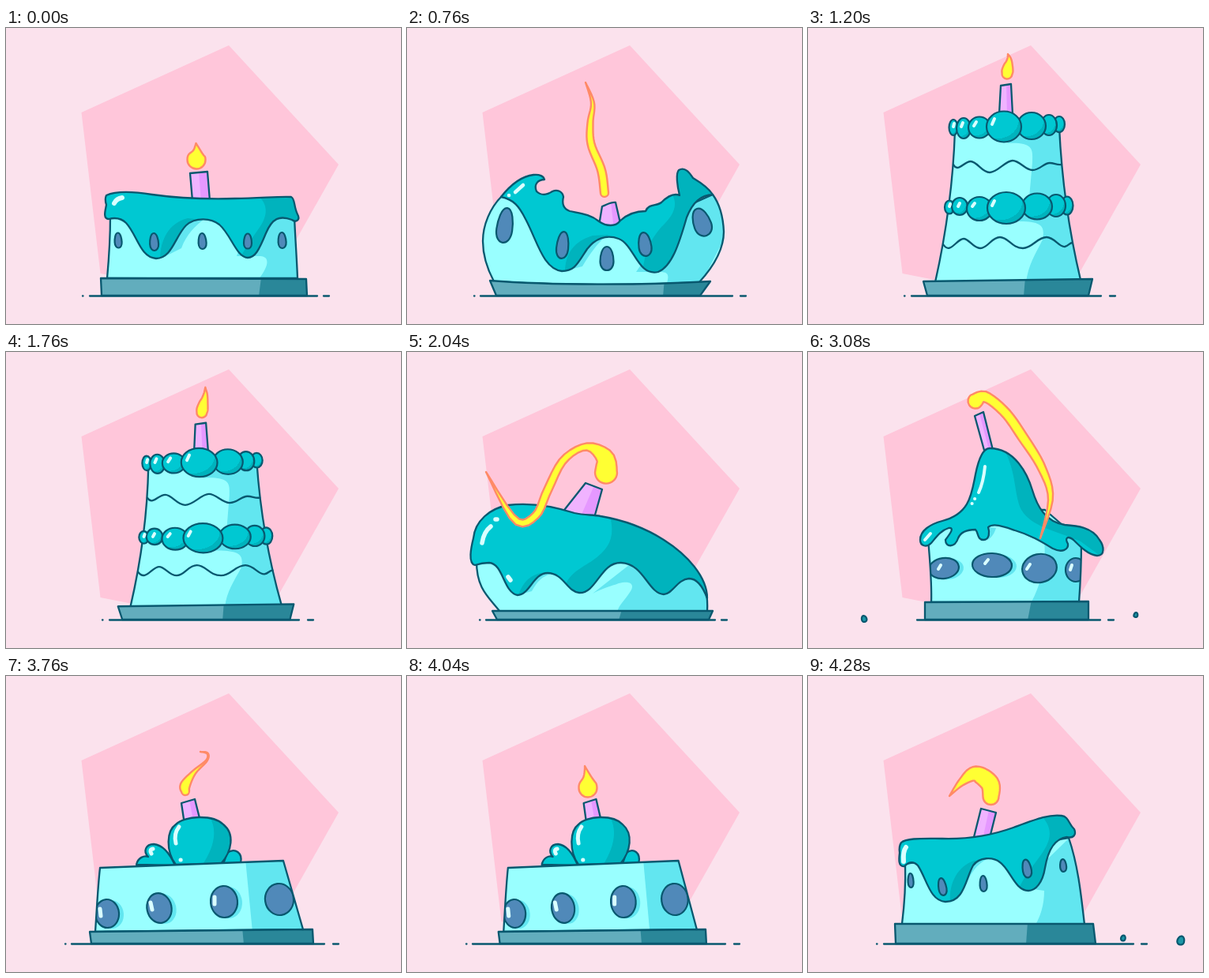
Recreate the animation shown at these times as an HTML page. Size 500 by 375 pixels, loop 4.36 s.

```html
<!DOCTYPE html>
<html lang="en">
<head>
<meta charset="utf-8">
<title>Birthday cakes</title>
<style>
  html, body { margin: 0; width: 100%; height: 100%; overflow: hidden; background: #fbe2ed; }
  svg { display: block; width: 100%; height: 100%; }
  path, ellipse { vector-effect: non-scaling-stroke; }
  .line { fill: none; stroke: #08586f; stroke-width: 2.3; stroke-linecap: round; stroke-linejoin: round; }
  .shine { fill: none; stroke: #d9ffff; stroke-linecap: round; }
  .flame { fill: #ffff33; stroke: #ff8a66; stroke-width: 2.4; stroke-linejoin: round; }
</style>
</head>
<body>
<svg viewBox="0 0 500 375">
  <defs>
    <radialGradient id="puff" cx=".32" cy=".28" r=".72">
      <stop offset=".84" stop-color="#00c8d2"/>
      <stop offset=".84" stop-color="#00b3bd"/>
    </radialGradient>
  </defs>
  <path fill="#ffc6da" d="M95.500 107 282 22 421 173 342 313 160 319 119.500 311Z"/>
  <g id="scene"></g>
</svg>
<script>
const LOOP = 4360, FLOOR = 339, MID = 245, SAMPLES = 32;
const INK = '#08586f';
const scene = document.getElementById('scene');

// Moments at which the drawing changes; it holds in between.
const steps = [
  0, 40, 120, 200, 280, 360, 480,
  600, 640, 680, 760, 800, 840, 920, 1000, 1080,
  1200, 1320, 1400, 1480, 1600, 1720,
  1760, 1800, 1840, 1880, 1960, 2040, 2080, 2120, 2200,
  2320, 2440, 2560, 2640, 2760,
  2920, 2960, 3000, 3080, 3160, 3240, 3320, 3400,
  3520, 3600, 3680, 3760, 3840, 3920, 4040,
  4120, 4200, 4280
];

// Flame spines run from base to tip: x y halfwidth.
const DROP = '241 167 11.500;241 162 10.500;241.500 155 4.500;240.500 146 0';
const DROP_TIP = [244, 183];

const drip = {
  tip: '244 183',
  ground: '97 106 394 402',
  base: 'M120 317 L380 318 L381 339 L121 339 Z',
  baseTone: 'M323 316 L382 316 L382 340 L320 340 Z',
  candle: 'M233 184 L255 182 L258 219 L236 219 Z',
  candleTone: 'M244 181 L257 180 L260 220 L247 220 Z',
  body: 'M132 238 C132 270 130 295 128 317 L369 317 C368 290 366 265 365 238 Z',
  bodyTone: 'M292 289 L322 289 C335 290 332 302 320 318 L371 318 L367 238 L310 238 Z M196 292 L222 279 C228 262 240 250 250 243 L228 240 Z',
  icing: 'M127 212 C140 206 160 207 185 211 C220 216 250 217 290 216 C320 216 345 213 361 214 C366 216 364 226 369 236 C373 243 367 247 362 243 C346 237 337 241 329 260 C320 282 315 291 306 291 C292 291 285 262 270 249 C260 241 240 239 228 250 C214 264 210 292 190 292 C170 291 166 262 152 247 C146 241 138 240 130 242 C122 242 126 230 127 224 C125 218 126 214 127 212 Z',
  icingTone: 'M318 212 C334 224 330 240 320 254 C310 268 302 280 296 292 L310 296 L375 250 L375 208 Z M195 294 C195 270 205 247 230 241 L250 243 L215 294 Z',
  seeds: '142 269 4.500 9.500 -3;187.500 271 5.500 11 -3;248.500 270 5 10 -3;306 270 5 9.500 0;349.500 269 5 10 -3',
  shine: 'M137 222 Q140 216 147 215',
  shineWidth: 6
};

const dripLean = {
  tip: '228 170',
  ground: '87 96 412 422',
  base: 'M110 314 L361 314 L364 339 L111 339 Z',
  baseTone: 'M278 312 L363 312 L366 340 L276 340 Z',
  candle: 'M219 168 L238 173 L230 205 L209 208 Z',
  candleTone: 'M229 170 L240 172 L232 206 L221 207 Z',
  body: 'M123 238 C124 270 122 290 119 314 L350 315 C346 280 342 240 330 205 Z',
  bodyTone: 'M285 270 L299 272 C299 290 294 305 288 315 L352 316 L332 204 L300 235 Z M180 288 L196 272 C204 258 206 244 226 232 L208 232 Z',
  icing: 'M118 211 C125 205 145 206 170 206 C205 207 235 201 260 192 C290 181 305 175 321 177 C330 178 330 188 337 194 C340 201 336 206 328 204 C312 206 304 220 300 243 C297 262 288 272 279 272 C262 272 256 245 243 236 C234 229 217 229 209 240 C199 258 198 286 174 286 C154 285 150 256 139 240 C134 235 128 235 122 241 C114 242 115 232 116 224 C115 218 116 214 118 211 Z',
  icingTone: 'M296 178 C312 195 306 210 296 225 C284 242 272 255 266 272 L280 276 L340 215 L340 172 Z M180 288 C178 264 188 242 210 234 L228 232 L198 288 Z',
  seeds: '130 259 3.500 9 -3;170 267 5 11 -10;222 263 4.500 10 -3;277 244 5.500 11.500 -10;323 240 4 8 -5',
  shine: 'M121 235 Q120 222 124 217'
};

const acts = [
  { // dripping cake, leaning in and settling
    ...drip, from: 0, lean: dripLean,
    flare: '231.500 153 10;230 136 11.500;212 124 9.500;195 134 4.500;179 152 0',
    flareAt: 4280, span: 80,
    keys: [[0, 1, 1, 0, 1], [120, 1, 1, 0, 1.08], [280, 1, 1, 0, .95], [480, 1, 1, 0, 1],
      [600, 1.02, .95, 0, 1], [640, 1.05, .88, 0, 1], [680, 1.08, .75, 0, 1],
      [4200, 1.04, .8, -4, -.1], [4280, 1, 1, 0, 0]]
  },
  { // the same cake, burst open
    from: 760, tip: '255 222', ground: '85 93 412 422',
    base: 'M105 320 C180 326 300 326 384 321 L371 339 L113 339 Z',
    baseTone: 'M326 318 L386 318 L374 340 L324 340 Z',
    candle: 'M247 226 C253 224 258 220 264 221 L272 256 L242 256 Z',
    candleTone: 'M258 220 L266 219 L274 256 L262 256 Z',
    body: 'M120 213 C105 228 96 250 96 270 C96 290 102 306 110 321 C180 326 300 326 370 322 C390 300 401 280 401 258 C400 235 395 222 387 211 L300 250 L200 250 Z',
    bodyTone: 'M290 309 L320 309 C332 309 332 314 328 326 L372 324 L405 260 L388 208 L350 220 Z M198 308 L222 302 C232 285 240 275 250 265 L230 268 Z',
    icing: 'M119 214 C130 200 143 188 160 186 C168 185 173 188 174 192 C166 192 160 198 164 207 C170 213 178 211 184 207 C190 204 197 207 198 214 C196 222 198 229 206 232 C220 235 232 236 243 245 C253 252 264 252 270 244 C280 235 292 232 302 232 C306 222 316 226 322 221 C330 213 338 209 345 212 C342 200 340 184 344 180 C352 175 358 184 362 190 C372 196 382 203 387 211 C372 212 362 220 354 240 C344 275 335 302 318 309 C292 315 288 275 268 267 C252 261 238 267 228 280 C215 300 212 308 196 308 C172 305 165 270 150 242 C142 226 135 217 119 214 Z',
    icingTone: 'M335 210 C345 225 335 240 322 252 C308 268 300 285 298 312 L330 312 L395 215 L360 178 L342 178 Z M200 310 C200 285 212 270 235 263 L255 262 L215 310 Z',
    seeds: '124 250 10 22 8;197 275 7.500 17 6;253 292 8.500 15 0;301 274 8 15 -8;373 246 11 18 -20',
    shine: 'M137 208 L147 199 M129 212 h.1', shineWidth: 4.5,
    flare: '250 209 5;246 180 5;233 147 4.500;232 120 3.500;235 95 2;226 69 0',
    flareAt: 760, span: 1000,
    keys: [[760, 1, 1, 0], [800, 1.04, .85, 0]]
  },
  { // tall cake with two cream rings
    from: 840, tip: '250 72', ground: '122 131 371 382',
    base: 'M146 321 L360 318 L355 339 L151 339 Z',
    baseTone: 'M275 316 L364 316 L358 340 L273 340 Z',
    candle: 'M244 73 L257 71 L259 109 L242 109 Z',
    candleTone: 'M251 70 L259 70 L261 110 L252 110 Z',
    body: 'M186 130 C184 190 176 255 161 322 L345 319 C331 260 321 190 318 125 Z',
    bodyTone: 'M252 146 C288 144 284 156 284 170 L280 215 L335 215 L318 125 L280 125 Z M246 246 C298 242 300 250 297 268 C287 288 279 300 276 322 L350 322 L330 215 L280 215 Z',
    waves: 'M184 173 C190 184 197 169 206 169 C214 169 220 183 230 183 C240 183 250 168 259 168 C268 168 275 180 284 180 C294 180 298 171 306 171 C312 171 315 174 321 173 M171 274 C180 288 188 267 197 267 C204 267 209 279 218 279 C228 279 232 265 243 265 C254 265 258 279 272 279 C284 279 290 265 302 265 C312 265 318 278 325 277 C330 276 331 272 335 272',
    blobs: '184 126 5.500 10;318 122 7 10;197 127 9 13;305 123 10 13;217 126 14 13.500;283 124 18 17;248 125 22 19.500;179 227 6 8.500;328 225 7.500 11.500;192 226 10 11;314 225 12 14;217 229 16 15;290 226 19 16.500;251 228 24 20',
    shine: 'M185 121 l-1 4 M196 120 l-2 5 M213 119 l-3 5 M236 115 l-3 7 M180 223 l-1 3 M192 222 l-2 4 M211 222 l-3 4 M236 219 l-3 6', shineWidth: 4,
    drop: '252 58 6.500;252.500 54 7;253.500 48 5.700;254.500 43 3.800;254.500 38 2;253 33 0',
    keys: [[840, .85, 1.14, 0], [920, .95, 1.1, -3], [1000, 1.08, .92, 2], [1080, .98, 1.03, -1],
      [1200, 1, 1, 0], [1400, 1, 1.01, 1], [1720, 1, 1, 0], [1760, 1.04, .93, 1], [1840, 1.15, .72, 4]]
  },
  { // glazed dome
    from: 1880, tip: '236 170', ground: '92 100 390 398',
    base: 'M108 328 L387 328 L382 339 L114 339 Z',
    baseTone: 'M272 326 L390 326 L384 340 L268 340 Z',
    candle: 'M226 166 L247 174 L237 210 L196 204 Z',
    candleTone: 'M237 169 L249 173 L239 211 L220 208 Z',
    body: 'M88 265 C88 300 103 310 117 328 L380 329 C381 310 378 295 370 288 L300 240 L100 250 Z',
    bodyTone: 'M235 306 C250 298 258 297 268 293 C284 289 288 295 283 303 C275 316 268 320 266 330 L382 330 L374 288 L300 255 Z M140 308 L158 303 C165 290 172 284 182 281 L160 278 Z',
    icing: 'M86 270 C77 268 81 248 84 236 C86 214 105 198 128 194 C160 190 190 197 212 204 C225 207 235 206 245 208 C275 213 300 222 325 238 C355 257 380 285 380 312 C374 296 366 287 357 287 C342 288 336 307 325 307 C305 306 300 268 271 267 C245 266 240 306 218 305 C203 304 198 280 178 280 C160 280 155 308 140 308 C122 305 122 268 104 267 C98 267 92 268 86 270 Z',
    icingTone: 'M256 205 C264 232 258 248 235 264 C222 273 205 280 200 297 L225 312 L385 320 L385 220 Z M140 310 C146 295 152 282 175 279 L185 280 L150 310 Z',
    shine: 'M95 242 Q97 228 106 221 M112 212 h2 M128 285 l3 4', shineWidth: 5.5,
    flare: '252 153 14;250 133 11;227 120 4.500;198 137 4.500;178 175 5;163 207 4.500;137 213 4;100 152 0',
    flareAt: 2040, span: 160,
    keys: [[1880, .95, 1.2, -4], [1960, .95, 1.15, -6], [2040, 1, 1, 0], [2120, .96, 1.1, -12],
      [2200, .97, 1.05, -6], [2320, .97, 1.06, -9], [2560, .97, 1.08, -7], [2760, .97, 1.06, -8],
      [2920, 1.02, .95, -8], [2960, 1.08, .75, -4]]
  },
  { // cream peak
    from: 3000, tip: '216 78', ground: '138 138 370 380',
    base: 'M148 317 L355 316 L355 339 L148 339 Z',
    baseTone: 'M283 314 L357 314 L357 340 L278 340 Z',
    candle: 'M211 81 L222 76 L235 128 L224 128 Z',
    candleTone: 'M217 78 L224 75 L236 128 L230 128 Z',
    body: 'M152 235 C154 265 157 290 156 317 L343 317 C345 290 346 265 346 240 L300 200 L200 200 Z',
    bodyTone: 'M285 232 L299 240 C302 265 295 295 282 318 L345 318 L348 225 Z M228 222 L238 223 C234 236 226 242 216 237 Z',
    berries: '172 274 19 13 -8;233 270 25 15 2;293 274 22 18 -12;339 276 13 15 0',
    icing: 'M230 122 C222 122 216 135 212 155 C207 180 205 205 170 214 C155 218 142 226 142 238 C142 246 150 248 156 242 C162 235 168 226 178 223 C186 222 180 230 174 238 C174 248 186 248 190 236 C194 226 204 225 212 225 C216 229 214 238 222 238 C230 238 230 228 228 222 C235 216 250 222 262 226 C282 232 295 240 310 249 C322 255 330 250 329 243 C325 236 328 232 336 238 C345 247 355 257 366 258 C376 258 375 246 369 238 C360 222 340 220 325 219 C300 215 290 195 284 175 C278 155 262 122 230 122 Z',
    icingTone: 'M245 118 C265 150 260 180 270 200 C284 222 310 225 345 240 L375 262 L380 210 L290 120 Z',
    shine: 'M224 145 Q222 165 216 178 M211 186 h.2 M207.500 192 h.2 M148 238 L155 230 M165 275 l3 -5 M224 268 l4 -5 M277 275 l4 -6 M332 276 l2 -6', shineWidth: 4,
    flare: '212 62 9.500;225 57 6.500;250 77 6;272 108 6;295 145 5;307 185 3;294 236 0',
    flareAt: 3080, span: 160,
    keys: [[3000, 1.02, .85, 4], [3080, 1, 1, 0], [3160, 1.05, .86, -4], [3240, 1.1, .78, 3],
      [3400, 1.08, .82, 0], [3520, 1.1, .76, 0], [3600, 1.16, .62, -3]]
  },
  { // big scoop on a slab
    from: 3680, tip: '231 158', ground: '75 83 403 414', scoop: true,
    base: 'M106 324 L388 321 L389 339 L108 339 Z',
    baseTone: 'M299 318 L391 318 L391 340 L301 340 Z',
    candle: 'M222 161 L239 156 L246 184 L226 188 Z',
    candleTone: 'M232 157 L241 154 L248 186 L238 188 Z',
    puffs: 'M165 239 C167 230 175 227 180 229 C173 222 177 213 187 213 C198 214 207 224 214 240 Z M280 224 C290 217 300 224 297 237 L275 238 Z',
    icing: 'M215 239 C202 222 203 196 215 188 C225 177 262 175 275 188 C290 200 286 222 272 238 Z',
    icingTone: 'M256 176 C270 195 262 220 248 240 L290 240 L290 176 Z',
    body: 'M119 243 L351 234 L376 321 L113 324 C115 295 116 270 119 243 Z',
    bodyTone: 'M303 232 L353 232 L380 322 L312 324 Z',
    berries: '128 301 15 18 -5;194 294 15.500 19 -12;276 286 17 20 -5;346 283 18 20 -8',
    shine: 'M119 295 l1 9 M183 287 l2 9 M264 280 l0 9 M215 212 Q212 200 219 191 M221 233 h.2 M184 225 Q181 220 186 219', shineWidth: 5,
    flare: '227 146 5;227 138 6;238 122 2.500;254 107 .8;255 98 .6;246 96 0',
    flareAt: 3760, span: 160,
    keys: [[3680, .94, .95, 4], [3760, 1, 1, 0], [3840, .9, 1.03, -4], [3920, .95, .97, 2],
      [4040, .93, 1, 0], [4120, 1.02, .86, 0]]
  },
  { from: 4200 } // back to the first act
];
acts[6] = { ...acts[0], from: 4200 };

// Crumbs: moment, x, y, radius, speed.
const crumbs = [
  [920, 52, 334, 4, -.25], [920, 470, 330, 5, .25],
  [3080, 71, 338, 4, -.7], [3080, 415, 333, 3, .9],
  [4280, 399, 332, 3.5, .3], [4280, 472, 335, 5.5, .25]
];

const lerp = (a, b, k) => a + (b - a) * k;
const rows = text => text.split(';').map(row => row.trim().split(' ').map(Number));

// Blend two strings of the same form, number by number.
function mix(a, b, k) {
  const goal = b.match(/-?[\d.]+/g);
  let i = 0;
  return a.replace(/-?[\d.]+/g, n => lerp(+n, +goal[i++], k).toFixed(2));
}

function poseAt(keys, t) {
  const next = keys.findIndex(key => key[0] > t);
  if (next < 1) return keys[next ? keys.length - 1 : 0].slice(1);
  const a = keys[next - 1], b = keys[next], k = (t - a[0]) / (b[0] - a[0]);
  return a.slice(1).map((v, i) => lerp(v, b[i + 1], k));
}

function spline(text, [ox, oy]) {
  const p = rows(text), last = p.length - 1;
  return Array.from({ length: SAMPLES + 1 }, (_, s) => {
    const u = s / SAMPLES * last, i = Math.min(Math.floor(u), last - 1), f = u - i;
    const [a, b, c, d] = [-1, 0, 1, 2].map(o => p[Math.max(0, Math.min(last, i + o))]);
    const [x, y, w] = b.map((_, n) => b[n] + f / 2 * (c[n] - a[n] +
      f * (2 * a[n] - 5 * b[n] + 4 * c[n] - d[n] + f * (3 * (b[n] - c[n]) + d[n] - a[n]))));
    return [x - ox, y - oy, Math.max(0, w)];
  });
}

function ribbon(pts) {
  const side = sign => pts.map(([x, y, w], i) => {
    const a = pts[Math.max(0, i - 1)], b = pts[Math.min(SAMPLES, i + 1)];
    const dx = b[0] - a[0], dy = b[1] - a[1], len = Math.hypot(dx, dy) || 1;
    return [x - sign * dy / len * w, y + sign * dx / len * w].map(v => v.toFixed(2)).join(' ');
  });
  const r = pts[0][2], right = side(1), left = side(-1).reverse();
  return `M${right.concat(left).join('L')}A${r} ${r} 0 0 0 ${right[0]}Z`;
}

const path = (d, fill) => d ? `<path d="${d}" fill="${fill}"/>` : '';
const line = d => d ? `<path class="line" d="${d}"/>` : '';

function part(id, d, fill, inside) {
  if (!d) return '';
  return `<clipPath id="${id}"><path d="${d}"/></clipPath>
    <g clip-path="url(#${id})">${path(d, fill)}${inside}</g>${line(d)}`;
}

const oval = ([x, y, rx, ry, turn = 0], look) =>
  `<ellipse rx="${rx}" ry="${ry}" transform="translate(${x} ${y}) rotate(${turn})" ${look}/>`;
const inked = fill => `fill="${fill}" stroke="${INK}" stroke-width="2.2"`;

function seed([x, y, rx, ry, turn], fill = '#5089b9') {
  const d = `M0 ${-ry}C${rx * .75} ${-ry} ${rx} ${-ry * .2} ${rx} ${ry * .25}` +
    `C${rx} ${ry * 1.25} ${-rx} ${ry * 1.25} ${-rx} ${ry * .25}C${-rx} ${-ry * .2} ${-rx * .75} ${-ry} 0 ${-ry}Z`;
  return `<path d="${d}" transform="translate(${x} ${y}) rotate(${turn})" ${inked(fill)}/>`;
}

const each = (text, draw) => text ? rows(text).map(row => draw(row)).join('') : '';

function cakeMarkup(c) {
  const berry = b => oval([b[0] + 6, b[1] + 1, ...b.slice(2)], 'fill="#62e6f0"') + oval(b, inked('#5089b9'));
  const body = part('body', c.body, '#99ffff', path(c.bodyTone, '#62e6f0') + each(c.berries, berry));
  const icing = (c.puffs ? path(c.puffs, '#00c8d2') + line(c.puffs) : '') +
    part('icing', c.icing, '#00c8d2', path(c.icingTone, '#00b3bd'));
  return part('candle', c.candle, '#f0b3ff', path(c.candleTone, '#e598ff')) +
    (c.scoop ? icing + body : body + icing) +
    part('base', c.base, '#62adbd', path(c.baseTone, '#2a8799')) +
    line(c.waves) +
    each(c.blobs, b => oval(b, inked('url(#puff)'))) +
    each(c.seeds, seed) +
    `<path class="shine" stroke-width="${c.shineWidth}" d="${c.shine}"/>`;
}

function flameMarkup(act, cake, t, [sx, sy, lean]) {
  const [x, y] = rows(cake.tip)[0];
  const px = MID + (x - MID) * sx + Math.tan(lean * Math.PI / 180) * (y - FLOOR) * sy;
  const py = FLOOR + (y - FLOOR) * sy;
  const sway = Math.sin(t * Math.PI / 120);
  let pts = spline(act.drop || DROP, act.drop ? [x, y] : DROP_TIP).map(([a, b, w], i) => {
    const u = i / SAMPLES;
    return [a + 4 * sway * u * u, b - 8 * Math.abs(sway) * u * u, w];
  });
  if (act.flare) {
    const home = act.lean ? rows(act.lean.tip)[0] : [x, y];
    const k = Math.max(0, 1 - Math.abs(t - act.flareAt) / act.span);
    const flare = spline(act.flare, home);
    pts = pts.map((p, i) => p.map((v, n) => lerp(v, flare[i][n], k)));
  }
  return `<path class="flame" d="${ribbon(pts.map(([a, b, w]) => [a + px, b + py, w]))}"/>`;
}

function crumbMarkup(t) {
  return crumbs.map(([at, x, y, r, v]) => {
    const dt = t - at;
    if (dt < -80 || dt > 100) return '';
    const hop = 14 * Math.abs(Math.sin(dt * Math.PI / 160));
    return seed([x + v * dt, y - hop, r * .8, r, dt + 15 * Math.sign(v)], '#1c98a8');
  }).join('');
}

function draw(t) {
  const act = acts.filter(a => a.from <= t).pop();
  const pose = poseAt(act.keys, t);
  const cake = { ...act };
  if (act.lean) {
    for (const name in act.lean) cake[name] = mix(act.lean[name], act[name], pose[3]);
  }
  const [dot, start, end, dash] = rows(cake.ground)[0];
  const [sx, sy, lean] = pose;
  scene.innerHTML =
    line(`M${dot} 339.500h.5M${start} 339.500H${end}M${dash} 339.500h7`) +
    `<g transform="translate(${MID} ${FLOOR}) skewX(${lean}) scale(${sx} ${sy}) translate(${-MID} ${-FLOOR})">${cakeMarkup(cake)}</g>` +
    crumbMarkup(t) + flameMarkup(act, cake, t, pose);
}

const begin = performance.now();
let shown = -1;
function tick() {
  const t = (performance.now() - begin) % LOOP;
  const step = steps.filter(s => s <= t).pop();
  if (step !== shown) draw(shown = step);
  requestAnimationFrame(tick);
}
tick();
</script>
</body>
</html>
```
